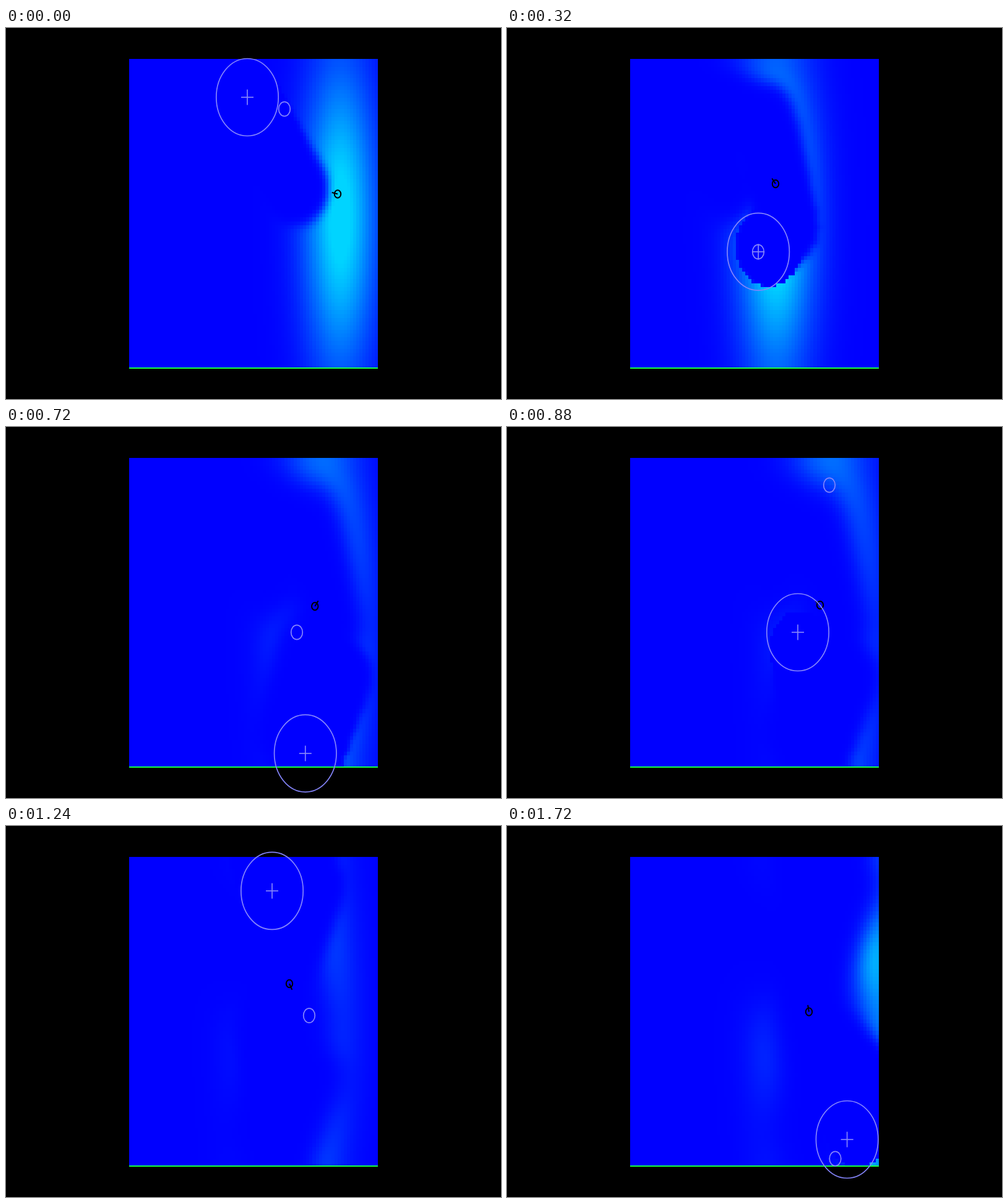
Animation, 800 px wide and 600 px high, one loop 1.74 s. Source, as an HTML page with a canvas:

```html
<!DOCTYPE html>
<html lang="en">
<head>
<meta charset="utf-8">
<title>Search field</title>
<style>
  html, body { margin: 0; width: 100%; height: 100%; overflow: hidden; background: #000; }
  canvas { display: block; }
</style>
</head>
<body>
<canvas id="stage" width="800" height="600"></canvas>
<script>
const ctx = document.getElementById('stage').getContext('2d');
const STEP = 20, STEPS = 87, WARMUP = 6;
const N = 80, LEFT = 199, TOP = 50, CW = 402 / N, CH = 500 / N;
const COLS = 104;      // the field is wider than the view, so it can drift
const REACH = 10.02;   // cells cleared around the searcher
const SPREAD = .15;    // diffusion per step
const RING = '#8585fb';

// Waypoints of the searcher: step, x, y
const route = [
  [-6.9, 468, 255], [0, 390, 112], [3.1, 450, 131], [5.1, 490, 148],
  [12, 477, 318], [16.01, 406, 362], [21.6, 406, 501], [28.95, 530.5, 400],
  [35.3, 485, 545], [44, 470, 332], [53.9, 521, 94], [59.7, 414, 51],
  [70.6, 490, 306.5], [77.4, 595, 425], [80.1, 550, 390], [83.3, 583, 453],
  [87.55, 530.5, 538]
];

// Rover: step, x, y, heading, drift of the field
const rover = [
  [0, 536, 268.5, 193, 0], [16, 434, 252, 233, -105], [28, 492.5, 292, 392, -40],
  [44, 506, 288, 217, -20], [62, 458, 255, 63, -75], [70, 485.5, 312, 59, -18],
  [86, 488, 300.5, -101, -16]
];

const clamp = (v, a, b) => Math.max(a, Math.min(b, v));
const mix = (a, b, u) => a + (b - a) * u;
const bell = (d, s) => Math.exp(-d * d / (2 * s * s));
const smooth = (a, b, v) => {
  const u = clamp((v - a) / (b - a), 0, 1);
  return u * u * (3 - 2 * u);
};

// Two neighbouring keys around a step, and the way between them
function span(list, step) {
  let n = list.findIndex(k => k[0] > step);
  if (n < 0) n = list.length - 1;
  n = Math.max(1, n);
  const a = list[n - 1], b = list[n];
  return { a, b, u: clamp((step - a[0]) / (b[0] - a[0]), 0, 1) };
}

function along(list, step) {
  const { a, b, u } = span(list, step);
  return a.map((v, k) => mix(v, b[k], u));
}

const driftAt = step => along(rover, step)[4];

function searcherCell(step, shift) {
  const [, x, y] = along(route, step);
  return [(x - shift - LEFT) / CW, (y - TOP) / CH];
}

function seedField() {
  const f = new Float32Array(COLS * N);
  for (let r = 0; r < N; r++) {
    for (let c = 0; c < COLS; c++) {
      const x = LEFT + (c + .5) * CW, y = TOP + (r + .5) * CH;
      f[r * COLS + c] = bell(x - 540, 40) * bell(y - 307, 175);
    }
  }
  return f;
}

function clear(f, [cx, cy]) {
  for (let r = 0; r < N; r++) {
    for (let c = 0; c < COLS; c++) {
      if (Math.hypot(c - cx, r - cy) < REACH) f[r * COLS + c] = 0;
    }
  }
}

function blur(f, dc, dr) {
  const out = new Float32Array(f.length);
  const at = (c, r) => f[clamp(r, 0, N - 1) * COLS + clamp(c, 0, COLS - 1)];
  for (let r = 0; r < N; r++) {
    for (let c = 0; c < COLS; c++) {
      out[r * COLS + c] = at(c, r) * (1 - 2 * SPREAD)
        + SPREAD * (at(c - dc, r - dr) + at(c + dc, r + dr));
    }
  }
  return out;
}

// The searcher wipes the field, which slowly diffuses back
function simulate() {
  const list = [];
  let f = seedField();
  for (let n = -WARMUP; n < STEPS; n++) {
    clear(f, searcherCell(n - 1, driftAt(n - 1)));
    if (n >= 0) list.push(f);
    f = blur(blur(f, 1, 0), 0, 1);
  }
  return list;
}

const fields = simulate();
const gain = step => 1.1 + .01 * step + 5 * smooth(70, 86, step);

const grid = document.createElement('canvas');
grid.width = grid.height = N;
const gctx = grid.getContext('2d');
const image = gctx.createImageData(N, N);

function paintField(step) {
  const f = fields[step], k = gain(step);
  const shift = -driftAt(step) / CW, whole = Math.floor(shift), part = shift - whole;
  const [cx, cy] = searcherCell(step - 1, 0);
  let o = 0;
  for (let r = 0; r < N; r++) {
    for (let c = 0; c < N; c++) {
      const i = r * COLS + c + whole;
      const v = Math.hypot(c - cx, r - cy) < REACH ? 0 : k * mix(f[i], f[i + 1], part);
      const hot = clamp((v - 1.5) * .8, 0, 1);
      image.data[o++] = 0;
      image.data[o++] = Math.min(v, 1) * 212 + hot * 12;
      image.data[o++] = 255 - hot * 50;
      image.data[o++] = 255;
    }
  }
  gctx.putImageData(image, 0, 0);
  ctx.imageSmoothingEnabled = false;
  ctx.drawImage(grid, LEFT, TOP, 402, 500);
  ctx.fillStyle = '#14ff46';
  ctx.fillRect(LEFT, 549, 402, 2);
}

function ring(x, y, rx, ry) {
  ctx.beginPath();
  ctx.ellipse(x, y, rx, ry, 0, 0, Math.PI * 2);
  ctx.stroke();
}

function line(x1, y1, x2, y2) {
  ctx.beginPath();
  ctx.moveTo(x1, y1);
  ctx.lineTo(x2, y2);
  ctx.stroke();
}

function paintRover(step) {
  const [, x, y, deg] = along(rover, step);
  const a = deg * Math.PI / 180;
  ctx.strokeStyle = '#000';
  ctx.lineWidth = 2;
  ring(x, y, 5.2, 6.2);
  line(x, y, x + 9.5 * Math.cos(a), y + 11 * Math.sin(a));
}

function paintSearcher(step) {
  const [, x, y] = along(route, step);
  const goal = span(route, step).b;
  ctx.strokeStyle = RING;
  ctx.lineWidth = 1.7;
  ring(x, y, 50.2, 62.5);
  ring(goal[1], goal[2], 9.3, 11.7);
  line(x - 10, y, x + 10, y);
  line(x, y - 12.5, x, y + 12.5);
}

function draw(now) {
  const step = Math.floor(now / STEP) % STEPS;
  ctx.fillStyle = '#000';
  ctx.fillRect(0, 0, 800, 600);
  paintField(step);
  paintRover(step);
  paintSearcher(step);
}

let start;
function tick(now) {
  start ??= now;
  draw(now - start);
  requestAnimationFrame(tick);
}
draw(0);
requestAnimationFrame(tick);
</script>
</body>
</html>
```
